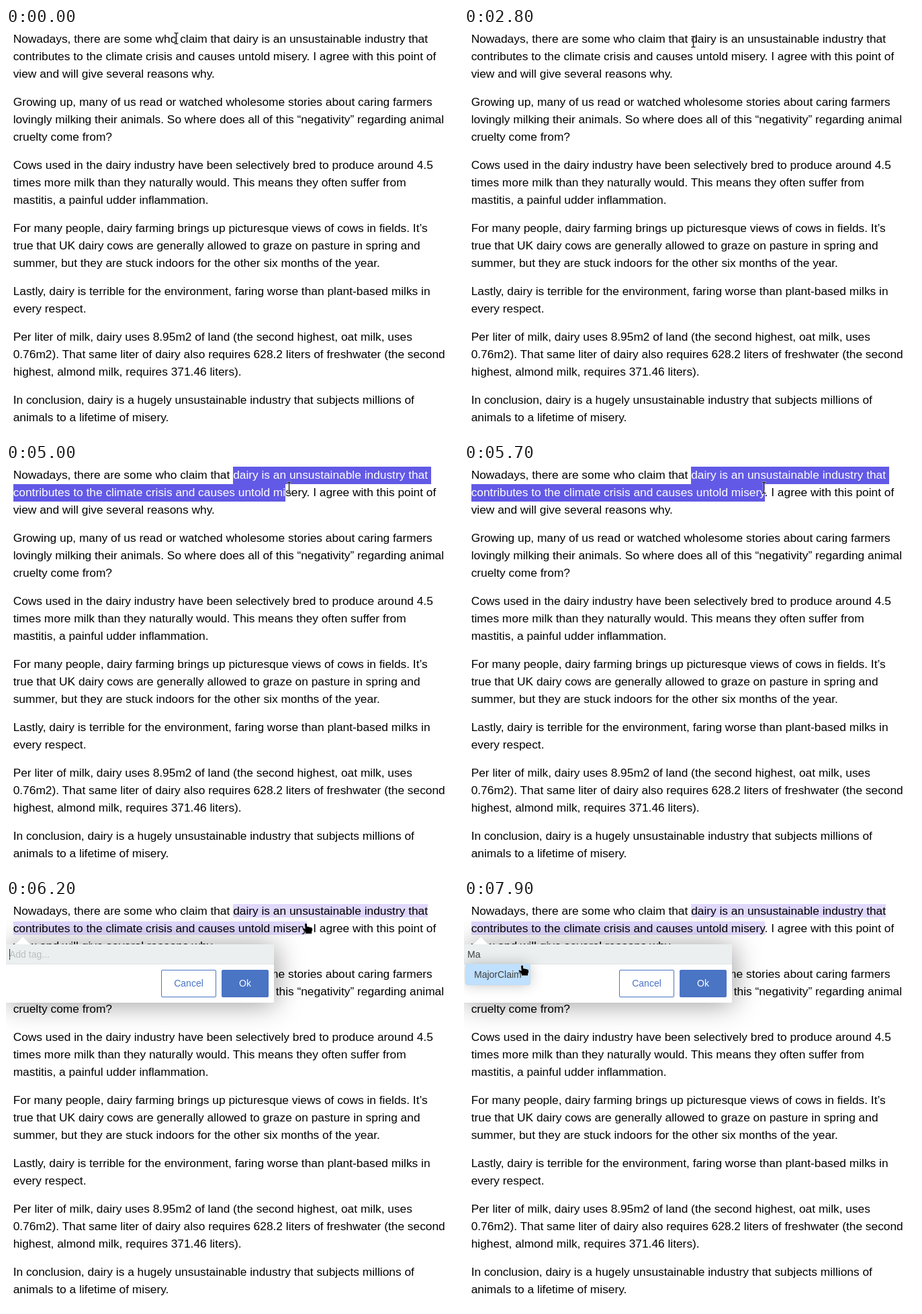
Write an HTML page that moves like this. It is 673 px wide and 608 px high and loops after 8 s.

```html
<!DOCTYPE html>
<html lang="en">
<head>
<meta charset="utf-8">
<title>Tagging a passage</title>
<style>
  html, body { margin: 0; width: 673px; height: 608px; overflow: hidden; background: #fff; }
  body { position: relative; font: 13pt/26px "Liberation Sans", Arial, sans-serif; color: #000; }
  article { position: absolute; left: 8pt; top: 3px; white-space: pre; }
  p { margin: 0 0 16px; }
  .selected { padding: 2px 0 4px; background: #6259e6; color: #fff; }
  .marked { white-space: pre-line; background: #e1d8fd; }

  #popup { position: absolute; left: -1px; top: 66px; width: 400px; height: 87px; background: #fff;
    border-radius: 2px; box-shadow: 2px 2px 42px rgba(0,0,0,.4); font-size: 14px; color: #3f3f3f; }
  #popup::before { content: ""; position: absolute; left: 15px; top: -11px; width: 22px; height: 11px;
    background: #fff; clip-path: polygon(50% 0, 100% 100%, 0 100%); }
  #popup div { position: absolute; box-sizing: border-box; }
  #popup .input { left: 0; top: 0; width: 400px; height: 30px; padding-left: 6px; line-height: 30px;
    background: #ebeff0; border-bottom: 1px solid #dfe3e5; white-space: pre; }
  #caret { display: inline-block; vertical-align: top; width: 1px; height: 16px; margin: 7px -1px 0 0; background: #222; }
  #hint { color: #b9bfc2; }
  #popup .button { top: 38px; height: 41px; line-height: 39px; text-align: center;
    border: 1px solid #4a74c4; border-radius: 2px; color: #4a74c4; }
  #popup .cancel { left: 232px; width: 82px; }
  #popup .ok { left: 322px; width: 70px; background: #4a74c4; color: #fff; }
  #popup #option { left: 4px; top: 30px; width: 95px; height: 30px; padding-left: 12px; line-height: 30px;
    background: #fff; border-radius: 3px; box-shadow: 0 0 0 1px #d6d7d9, 0 0 20px rgba(0,0,0,.25); }
  #popup #option.hover { background: #bfe0fe; box-shadow: 0 0 0 1px #c3dcf0, 0 0 20px rgba(0,0,0,.25); }

  svg { position: absolute; left: 0; top: 0; }
  #pointer { fill: #000; stroke: #fff; stroke-width: 1; paint-order: stroke; stroke-linejoin: round;
    filter: drop-shadow(.5px .5px .5px rgba(0,0,0,.4)); }
</style>
</head>
<body>
<article><p><span id="before"></span><span id="chosen"></span><span id="after"></span></p><p>Growing up, many of us read or watched wholesome stories about caring farmers
lovingly milking their animals. So where does all of this “negativity” regarding animal
cruelty come from?</p><p>Cows used in the dairy industry have been selectively bred to produce around 4.5
times more milk than they naturally would. This means they often suffer from
mastitis, a painful udder inflammation.</p><p>For many people, dairy farming brings up picturesque views of cows in fields. It’s
true that UK dairy cows are generally allowed to graze on pasture in spring and
summer, but they are stuck indoors for the other six months of the year.</p><p>Lastly, dairy is terrible for the environment, faring worse than plant-based milks in
every respect.</p><p>Per liter of milk, dairy uses 8.95m2 of land (the second highest, oat milk, uses
0.76m2). That same liter of dairy also requires 628.2 liters of freshwater (the second
highest, almond milk, requires 371.46 liters).</p><p>In conclusion, dairy is a hugely unsustainable industry that subjects millions of
animals to a lifetime of misery.</p></article>

<div id="popup">
  <div class="input"><span id="typed"></span><i id="caret"></i><span id="hint">Add tag...</span></div>
  <div class="button cancel">Cancel</div>
  <div class="button ok">Ok</div>
  <div id="option">MajorClaim</div>
</div>

<svg width="673" height="608"><path id="pointer"/></svg>

<script>
const LOOP = 8000, STEP = 100;
const $ = id => document.getElementById(id);
const clamp = v => Math.max(0, Math.min(1, v));

const lead = 'Nowadays, there are some who claim that ';
const passage = 'dairy is an unsustainable industry that \ncontributes to the climate crisis and causes untold misery';
const rest = '. I agree with this point of\nview and will give several reasons why.';

// [start, end, x, y]: the pointer travels to x,y between start and end
const moves = [
  [300, 400, 252, 15.5], [800, 1200, 292, 21.5], [1800, 1900, 306, 26],
  [1900, 2000, 325, 27], [2000, 2100, 343, 26], [2200, 2400, 341, 24.5],
  [2700, 2800, 341, 20.5], [3200, 3300, 340, 19.5], [4100, 4200, 375, 32],
  [4200, 4500, 415, 36], [4900, 5000, 421, 35.5], [5000, 5700, 446, 35.5],
  [7300, 7900, 86, 98]
];
// [time, number of selected characters]
const selection = [[0, 0], [4200, 2], [4300, 90], [4400, 93], [4500, 94], [5000, 95],
  [5200, 96], [5400, 97], [5500, 98], [5600, 99]];
const typing = [[0, ''], [6100, ''], [6900, 'M'], [7200, 'Ma']];

const shapes = {
  beam: 'M-2.5-8.5h2.5l.5.5.5-.5h2.5v1h-2l-.5.7v13.6l.5.7h2v1h-2.5l-.5-.5-.5.5h-2.5v-1h2l.5-.7v-13.6l-.5-.7h-2z',
  arrow: 'M0 .5V15l3.3-3.1 2.6 5.6 2.3-1-2.6-5.5h4.6z',
  hand: 'M-1 .3Q.5-1.2 2 .3V4l6.5 1.6Q10 6 10 7.5V10l-1 2v2.5H0v-2l-4-4Q-5 6.8-3.4 6.4l3 1.4z'
};

const latest = (keys, t) => keys.filter(k => k[0] <= t).pop();

function pointerAt(t) {
  let x = 253, y = 15.5;
  for (const [start, end, toX, toY] of moves) {
    const k = clamp((t - start) / (end - start));
    const eased = start > 7000 ? k * (2 - k) : k;
    x += (toX - x) * eased;
    y += (toY - y) * eased;
  }
  return { x, y };
}

function pointerShape({ x, y }, t, onOption) {
  if (t >= 6000) {
    if (onOption || (x < 449 && y > 33 && y < 53)) return 'hand';
    if (x < 399 && y > 96) return 'arrow';
  }
  const inLine = (y - 4) % 26;
  return inLine >= 3 && inLine < 22 || inLine > 29 - 26 * (y < 30) || y > 33 ? 'beam' : 'arrow';
}

function draw(t) {
  const tagged = t >= 6000;
  const count = latest(selection, t)[1];
  $('before').textContent = lead;
  $('chosen').textContent = passage.slice(0, count);
  $('chosen').className = tagged ? 'marked' : count ? 'selected' : '';
  $('after').textContent = passage.slice(count) + rest;

  const fade = clamp((t - 5970) / 200);
  $('popup').style.opacity = tagged ? fade * fade * (3 - 2 * fade) : 0;
  const [since, text] = latest(typing, t);
  $('typed').textContent = text;
  $('hint').hidden = text !== '';
  $('caret').style.opacity = (t - since) % 1000 < 500 ? 1 : 0;

  const pos = pointerAt(t);
  const onOption = text !== '' && pos.x < 99 && pos.y > 95;
  $('option').hidden = text === '';
  $('option').className = onOption ? 'hover' : '';
  $('pointer').setAttribute('d', shapes[pointerShape(pos, t, onOption)]);
  $('pointer').setAttribute('transform', `translate(${Math.round(pos.x)} ${Math.round(pos.y * 2) / 2})`);
}

function frame() {
  draw(Math.floor(performance.now() % LOOP / STEP) * STEP);
  requestAnimationFrame(frame);
}
frame();
</script>
</body>
</html>
```
